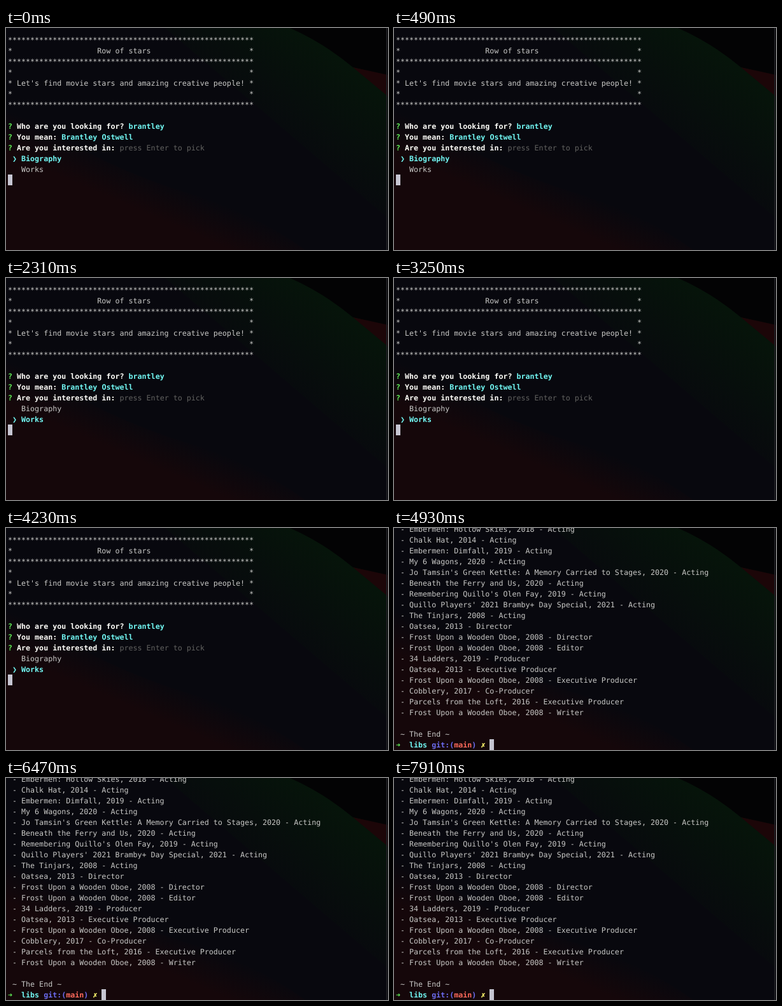
Write an HTML page that moves like this. It is 600 by 350 pixels and loops after 8 s.

```html
<!DOCTYPE html>
<html lang="en">
<head>
<meta charset="utf-8">
<title>Terminal session</title>
<style>
html, body { margin: 0; width: 100%; height: 100%; overflow: hidden; background: #08080e; }
svg { display: block; width: 600px; height: 350px; }
text {
  font: 11.66px "DejaVu Sans Mono", "Liberation Mono", monospace;
  white-space: pre;
  text-rendering: geometricPrecision;
}
.plain { fill: #c8c8c6; }
.bold { fill: #fffffa; font-weight: bold; }
.cyan { fill: #72f8f4; font-weight: bold; }
.green { fill: #62f058; font-weight: bold; }
.blue { fill: #6c6cf0; font-weight: bold; }
.red { fill: #ff6a5c; font-weight: bold; }
.yellow { fill: #fffa70; stroke: #fffa70; stroke-width: .4; }
.hint { fill: #626260; }
.cursor { fill: #c6c6d2; }
</style>
</head>
<body>
<svg viewBox="0 0 600 350">
  <defs>
    <linearGradient id="leaf" gradientUnits="userSpaceOnUse" x1="400" y1="180" x2="510" y2="40">
      <stop offset="0" stop-color="#06140a" stop-opacity="0"/>
      <stop offset="1" stop-color="#06140a"/>
    </linearGradient>
    <linearGradient id="ember" gradientUnits="userSpaceOnUse" x1="200" y1="215" x2="150" y2="330">
      <stop offset="0" stop-color="#15070a" stop-opacity="0"/>
      <stop offset=".5" stop-color="#15070a"/>
    </linearGradient>
  </defs>
  <rect width="600" height="350" fill="#08080e"/>
  <path d="M250 0H600V300Z" fill="url(#leaf)"/>
  <path d="M0 115Q120 205 260 252Q390 290 470 350H0Z" fill="url(#ember)"/>
  <path d="M446 0H600V75L545 62Q500 24 446 0Z" fill="#030304"/>
  <path d="M545 62L600 74V108Z" fill="#1c0608"/>
  <rect x="597" width="2" height="350" fill="#1c1c20"/>
  <g id="stage"></g>
</svg>
<script>
const LOOP = 8000, SELECT_AT = 2290, LIST_AT = 4600;
const COL = 7.02, ROW = 17, LEFT = 3, BASELINE = 13;
const stage = document.getElementById('stage');

function add(parent, tag, attrs, content = '') {
  const node = document.createElementNS('http://www.w3.org/2000/svg', tag);
  for (const key in attrs) node.setAttribute(key, attrs[key]);
  node.textContent = content;
  return parent.appendChild(node);
}

// A screen is a group of text rows visible from start to end.
function screen(top, start, end) {
  const group = add(stage, 'g', { transform: `translate(${LEFT} ${top})` });
  const frames = [
    { opacity: start ? 0 : 1, offset: 0, easing: 'step-end' },
    ...(start ? [{ opacity: 1, offset: start / LOOP, easing: 'step-end' }] : []),
    ...(end < LOOP ? [{ opacity: 0, offset: end / LOOP, easing: 'step-end' }] : []),
    { opacity: end < LOOP ? 0 : 1, offset: 1 }
  ];
  group.animate(frames, { duration: LOOP, iterations: Infinity });
  return {
    write: (row, col, style, content) =>
      add(group, 'text', { x: col * COL, y: row * ROW + BASELINE, class: style }, content),
    cursor: (row, col) =>
      add(group, 'rect', { x: Math.round(col * COL), y: row * ROW, width: 7, height: ROW, class: 'cursor' })
  };
}

const form = screen(10, 0, LIST_AT);
const rule = '*'.repeat(55);
const boxed = content => `*${content.padEnd(53)}*`;
[
  rule, boxed(' '.repeat(19) + 'Row of stars'), rule, boxed(''),
  boxed(" Let's find movie stars and amazing creative people!"), boxed(''), rule
].forEach((line, row) => form.write(row, 0, 'plain', line));

[
  ['Who are you looking for?', 'cyan', 'brantley'],
  ['You mean:', 'cyan', 'Brantley Ostwell'],
  ['Are you interested in:', 'hint', 'press Enter to pick']
].forEach(([question, style, answer], i) => {
  form.write(8 + i, 0, 'green', '?');
  form.write(8 + i, 2, 'bold', question);
  form.write(8 + i, question.length + 3, style, answer);
});
form.cursor(13, 0);

const options = ['Biography', 'Works'];
[[0, SELECT_AT], [SELECT_AT, LIST_AT]].forEach(([start, end], chosen) => {
  const menu = screen(10, start, end);
  options.forEach((name, i) => {
    menu.write(11 + i, 3, i === chosen ? 'cyan' : 'plain', name);
  });
  menu.write(11 + chosen, 1, 'cyan', '❯');
});

const list = screen(-7, LIST_AT, LOOP);
const play = 'Frost Upon a Wooden Oboe, 2008';
[
  ['Embermen: Hollow Skies, 2018', 'Acting'],
  ['Chalk Hat, 2014', 'Acting'],
  ['Embermen: Dimfall, 2019', 'Acting'],
  ['My 6 Wagons, 2020', 'Acting'],
  ["Jo Tamsin's Green Kettle: A Memory Carried to Stages, 2020", 'Acting'],
  ['Beneath the Ferry and Us, 2020', 'Acting'],
  ["Remembering Quillo's Olen Fay, 2019", 'Acting'],
  ["Quillo Players' 2021 Bramby+ Day Special, 2021", 'Acting'],
  ['The Tinjars, 2008', 'Acting'],
  ['Oatsea, 2013', 'Director'],
  [play, 'Director'],
  [play, 'Editor'],
  ['34 Ladders, 2019', 'Producer'],
  ['Oatsea, 2013', 'Executive Producer'],
  [play, 'Executive Producer'],
  ['Cobblery, 2017', 'Co-Producer'],
  ['Parcels from the Loft, 2016', 'Executive Producer'],
  [play, 'Writer']
].forEach(([title, role], row) => list.write(row, 1, 'plain', `- ${title} - ${role}`));
list.write(19, 1, 'plain', '~ The End ~');
[
  [0, 'green', '➜'], [3, 'cyan', 'libs'], [8, 'blue', 'git:('],
  [13, 'red', 'main'], [17, 'blue', ')'], [19, 'yellow', '✗']
].forEach(part => list.write(20, ...part));
list.cursor(20, 21);
</script>
</body>
</html>
```
